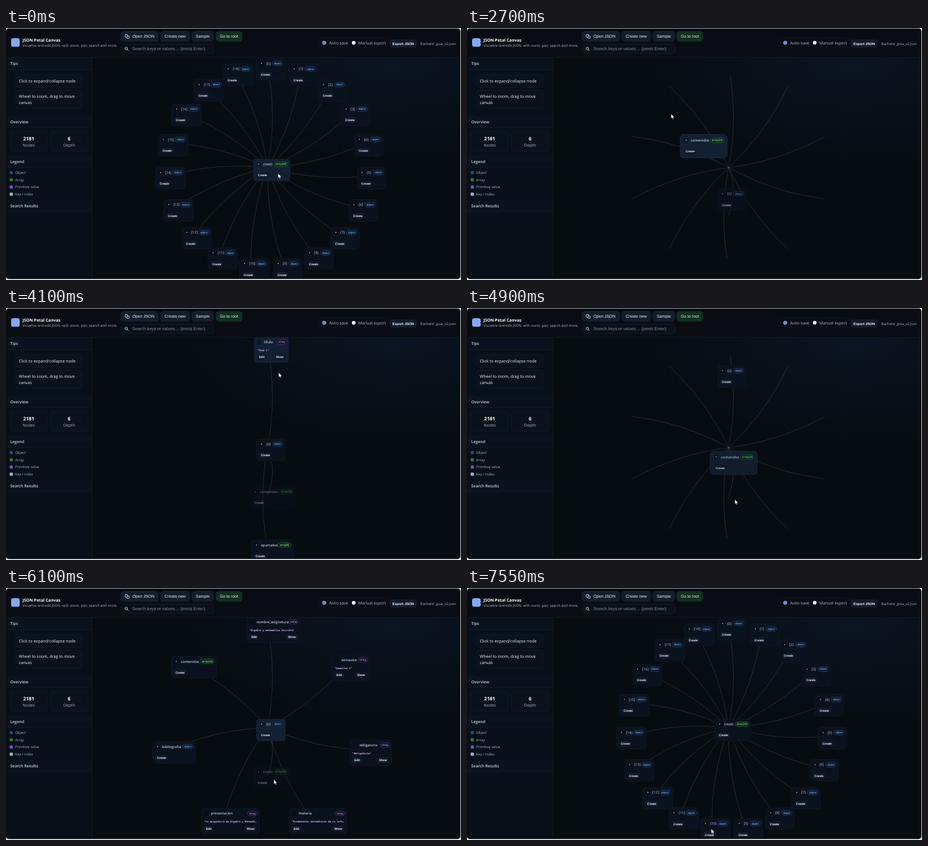
Write an HTML page that moves like this. It is 800 px wide and 444 px high and loops after 7650 ms.

```html
<!DOCTYPE html>
<html lang="en">
<head>
<meta charset="utf-8">
<title>JSON Petal Canvas</title>
<style>
  html, body { margin: 0; width: 100%; height: 100%; overflow: hidden; background: #dfe6ea; }
  svg { display: block; width: 100%; height: 100%; }
  text { font-family: "Open Sans", "Noto Sans", sans-serif; text-rendering: geometricPrecision; }
  .ui { font-family: "Liberation Sans", Arial, sans-serif; }
  .mono { font-family: "DejaVu Sans Mono", monospace; }
</style>
</head>
<body>
<svg viewBox="0 0 800 444">
  <defs>
    <radialGradient id="glow" gradientUnits="userSpaceOnUse" cx="680" cy="50" r="370" gradientTransform="translate(0 25) scale(1 .5)">
      <stop offset="0" stop-color="#0b1522"/><stop offset="1" stop-color="#0b1522" stop-opacity="0"/>
    </radialGradient>
    <clipPath id="stageClip"><rect x="152" y="52" width="646" height="389"/></clipPath>
    <clipPath id="linkClip"><rect x="152" y="86" width="646" height="319.5"/></clipPath>
  </defs>
  <rect x="0" y=".7" width="799" height="441.5" rx="5" fill="#070c10"/>
  <rect x="152" y="52" width="646" height="389" fill="url(#glow)"/>
  <g id="chrome"></g>
  <g clip-path="url(#stageClip)">
    <g id="links" clip-path="url(#linkClip)" fill="none" stroke="#9fb3c8" stroke-opacity=".27" stroke-width=".7"></g>
    <g id="nodes"></g>
  </g>
  <path id="cursor" d="M0 0V7.8L1.8 6.2 3 9 4.3 8.4 3.1 5.8H5.6Z" fill="#fff" stroke="#111" stroke-width=".3"/>
</svg>
<script>
const $ = id => document.getElementById(id);
const clamp = v => Math.max(0, Math.min(1, v));
const mix = (a, b, k) => a + (b - a) * k;

const box = (x, y, w, h, r, fill, stroke = 'none') =>
  `<rect x="${x}" y="${y}" width="${w}" height="${h}" rx="${r}" fill="${fill}" stroke="${stroke}" stroke-width=".7"/>`;
const label = (x, y, str, size, fill, { weight = 400, anchor = 'start', cls = '' } = {}) =>
  `<text x="${x}" y="${y}" font-size="${size}" fill="${fill}" font-weight="${weight}" text-anchor="${anchor}" class="${cls}">${str}</text>`;
const middle = { anchor: 'middle' };
const ui = { anchor: 'middle', cls: 'ui' };
const uiBold = { ...ui, weight: 700 };

// ---- Header and sidebar ----
function drawChrome() {
  const line = '#142030', pale = '#f0f4f9', grey = '#a9b5c4';
  const button = (x, w, str, tx, fill = '#131d2b') =>
    box(x, 6, w, 17.5, 4.5, fill, '#172438') + label(tx, 17.2, str, 7.2, pale, ui);
  const section = (y, h, str) =>
    box(1, y, 150, h, 0, '#0a131d') + box(1, y + h, 150, .7, 0, line) +
    label(7.5, y + h / 2 + 2.6, str, 7, '#ccd4df', { weight: 600 });
  const stat = (x, value, name) =>
    box(x, 182, 66.5, 35, 4.5, '#0a121c', line) +
    label(x + 33.5, 198, value, 8.5, '#fff', { ...middle, weight: 700 }) +
    label(x + 33.5, 209.2, name, 7.2, grey, middle);
  const legend = [['Object', '#274b7c'], ['Array', '#2b7a3e'], ['Primitive value', '#7d50c6'], ['Key / Index', '#a7afba']];

  return box(1, 1, 797, 50, 4, '#090d13') + box(1, 51, 150, 390, 4, '#081019') +
    box(1, 51, 797, .7, 0, line) + box(151, 51, .7, 390, 0, line) +
    box(9, 18, 15, 15, 3.5, '#83a9f5') +
    label(29, 23.6, 'JSON Petal Canvas', 7.3, '#fff', { weight: 700 }) +
    label(29, 32.8, 'Visualize and edit JSON, with zoom, pan, search and more.', 6.18, '#b0bbc9') +
    button(202, 66, 'Open JSON', 241.5) + button(272, 51, 'Create new', 297.5) +
    button(327, 38, 'Sample', 346) + button(369, 46, 'Go to root', 392, '#11301f') +
    '<path d="M209.5 11.5h4v4.5h-4zM213 14h3.500v4h-4v-2" fill="none" stroke="#dfe6ef" stroke-width=".8"/>' +
    box(202, 28, 164, 17, 4.5, '#0a1119', '#172333') +
    '<path d="M213.200 37.800l2.200 2.200" stroke="#e8edf4" stroke-width="1"/><circle cx="211.500" cy="36" r="2.200" fill="none" stroke="#e8edf4" stroke-width=".9"/>' +
    label(222, 39.2, 'Search keys or values… (press Enter)', 7.6, '#7f8995', { cls: 'ui' }) +
    box(549.5, 18, 122, 15.5, 4, 'none', '#0f1826') +
    '<circle cx="559.500" cy="26" r="3" fill="#4f8ae0" stroke="#b9cdec" stroke-width=".8"/><circle cx="611.300" cy="26" r="3.200" fill="#fff"/>' +
    label(568, 28.6, 'Auto-save', 7.3, '#b2bdcb') + label(619.5, 28.6, 'Manual export', 7.15, '#b2bdcb') +
    box(675, 21, 47, 13, 4, '#121c2a', '#172438') + label(698.3, 29.8, 'Export JSON', 6.17, '#f5f8fc', uiBold) +
    label(728.5, 29.8, 'Bachelor_guia_v2.json', 6.08, grey) +
    section(52, 21, 'Tips') + section(155, 20, 'Overview') + section(225, 20, 'Legend') + section(303, 20, 'Search Results') +
    box(17, 82, 116, 22.5, 4.5, '#0a121b', line) + label(22.5, 96, 'Click to expand/collapse node', 7.2, pale) +
    box(17, 109.5, 116, 32.5, 4.5, '#0a121b', line) +
    label(22.5, 123, 'Wheel to zoom, drag to move', 7.2, pale) + label(22.5, 133.8, 'canvas', 7.2, pale) +
    stat(6.5, '2181', 'Nodes') + stat(77.5, '6', 'Depth') +
    legend.map(([name, color], i) =>
      box(6.5, 252 + i * 12.7, 5.5, 5.5, 1.2, color) + label(16, 257 + i * 12.7, name, 6.18, grey)).join('');
}

// ---- Graph data ----
const node = (key, type, width, value) => ({ key, type, width, height: value ? 45 : 38, value });
const indexed = count => Array.from({ length: count }, (_, i) => node(`[${i}]`, 'object', i > 9 ? 52.5 : 50.5));

const root = node('(root)', 'array[19]', 64);
const contents = node('contenidos', 'array[10]', 79.5);
const courses = indexed(19), topics = indexed(10);
const fields = [
  node('nombre_asignatura', 'string', 95, '"Álgebra y matemática discreta"'),
  node('semestre', 'string', 67, '"Semestre 1"'),
  node('obligatorio', 'string', 74, '"Obligatorio"'),
  node('materia', 'string', 102, '"Fundamentos matemáticos de la info…'),
  node('presentacion', 'string', 102, '"La asignatura de Álgebra y Matemát…'),
  node('bibliografia', 'object', 75.5),
  contents
];
const parts = [node('titulo', 'string', 60, '"Tema 1"'), node('apartados', 'array[6]', 74)];

const rootView = { focus: root, children: courses };
const courseView = { focus: courses[0], parent: root, children: fields };
const contentsView = { focus: contents, parent: courses[0], children: topics };
const topicView = { focus: topics[0], parent: contents, children: parts };

// Each step appears abruptly with its move already partly done.
const steps = [
  { at: 0, view: rootView, done: 1 },
  { at: 1500, view: courseView, done: .87 },
  { at: 2700, view: contentsView, done: .62 },
  { at: 3800, view: topicView, done: .6 },
  { at: 4900, view: contentsView, done: .73 },
  { at: 5600, view: courseView, done: .55 },
  { at: 6400, view: rootView, done: .65 }
];
const LOOP = 7650, TICK = 50;
const HUB = { x: 460, y: 246 }, RADIUS = 177.5, PARENT_GAP = 84;

function layout({ focus, parent, children }) {
  const places = new Map();
  if (parent) places.set(parent, { x: HUB.x, y: HUB.y + PARENT_GAP, opacity: .45 });
  children.forEach((child, i) => {
    const a = i / children.length * 2 * Math.PI;
    places.set(child, { x: HUB.x + RADIUS * Math.sin(a), y: HUB.y - RADIUS * Math.cos(a), opacity: 1 });
  });
  return places.set(focus, { ...HUB, opacity: 1 });
}

function link(a, b) {
  const dx = b.x - a.x, dy = b.y - a.y, bend = 17 / Math.hypot(dx, dy);
  const cx = (a.x + b.x) / 2 - dy * bend, cy = (a.y + b.y) / 2 + dx * bend;
  return `<path d="M${a.x} ${a.y}Q${cx} ${cy} ${b.x} ${b.y}"/>`;
}

// ---- Cursor ----
const cursorPath = [
  [0, 478.5, 256.5], [650, 478.5, 256.5], [1250, 474.5, 86.5], [1600, 474.5, 86.5], [2250, 359, 151.5],
  [3200, 359, 151.5], [3450, 480.5, 88], [3950, 480.5, 88], [4700, 471, 337.5], [7250, 471, 337.5], [7550, 429.5, 424.5]
];
function cursorAt(t) {
  const i = cursorPath.findIndex(p => p[0] > t);
  if (i < 0) return cursorPath.at(-1).slice(1);
  const [t0, x0, y0] = cursorPath[Math.max(0, i - 1)], [t1, x1, y1] = cursorPath[i];
  const u = clamp((t - t0) / (t1 - t0 || 1)), k = u * u * (3 - 2 * u);
  return [mix(x0, x1, k), mix(y0, y1, k)];
}

// ---- Nodes ----
const badges = {
  object: ['#0c1c33', '#22436d', '#a3c8f6'],
  array: ['#0d2716', '#23653a', '#b0f5bd'],
  string: ['#150f25', '#4e347d', '#d0b6f7']
};
const carets = { focus: 'M-1.3 -.7H1.3L0 1Z', child: 'M-.7 -1.3V1.3L1 0Z', parent: 'M-.7 -1.3V1.3L1 0Z' };

const corner = (n, p) => ({ x: p.x + n.width * (.113 - .5), y: p.y + n.height * (.11 - .5) });
const contains = (n, p, [px, py]) => {
  const { x, y } = corner(n, p);
  return px >= x && px <= x + n.width && py >= y && py <= y + n.height;
};

function drawNode(n, place, role, lit, ringed) {
  const { x, y } = corner(n, place), w = n.width, h = n.height;
  const [fill, stroke, ink] = badges[n.type.split('[')[0]];
  const pill = n.type === 'object' ? 19 : n.type === 'string' ? 17 : 24;
  const grow = ringed ? 1.5 : 0;
  const small = (bx, bw, str) =>
    box(bx, h - 14.2, bw, 9.2, 2.5, '#121b29') + label(bx + bw / 2, h - 7.7, str, 5.15, '#f5f8fc', uiBold);
  const caret = n.value ? '' : `<path transform="translate(9 8.700)" d="${carets[role]}" fill="#d5deea"/>`;
  const actions = n.value
    ? label(4.7, h / 2 + 2.3, n.value, 4.25, '#d6bcff', { cls: 'mono', weight: 700 }) + small(4.5, 17, 'Edit') + small(w - 26, 21, 'Show')
    : small(5, 21.5, 'Create');
  return `<g transform="translate(${x} ${y})" opacity="${place.opacity}">` +
    box(-grow, -grow, w + 2 * grow, h + 2 * grow, 4.5 + grow, lit ? '#132033' : '#0a121e', ringed ? '#26364d' : lit ? '#182840' : '#101c2b') +
    box(5, 4.7, 8, 8, 2, lit ? '#0c1522' : '#080e16') + caret +
    label(17, 11, n.key, 6.05, '#c0cbd8', { weight: n.key[0] === '[' ? 400 : 600 }) +
    box(w - pill - 4, 4.5, pill, 8.4, 4.2, fill, stroke) +
    label(w - pill / 2 - 4, 10.3, n.type, 4.7, ink, ui) +
    actions + '</g>';
}

function render(t) {
  const index = steps.findLastIndex(s => s.at <= t);
  const { at, view, done } = steps[index], age = t - at;
  const target = layout(view), before = index ? layout(steps[index - 1].view) : target;
  const progress = 1 - (1 - done) * (1 - clamp(age / 200)) ** 2;
  const appear = index ? clamp((age - 80) / 200) : 1;

  const cursor = cursorAt(t), trailing = cursorAt(t - 110), resting = cursorAt(at);
  const still = Math.hypot(cursor[0] - resting[0], cursor[1] - resting[1]) < .5;

  let html = '';
  for (const [n, to] of target) {
    const from = before.get(n);
    const place = from
      ? { x: mix(from.x, to.x, progress), y: mix(from.y, to.y, progress), opacity: mix(from.opacity, to.opacity, progress) }
      : { ...to, opacity: to.opacity * appear };
    if (!place.opacity) continue;
    const role = n === view.focus ? 'focus' : n === view.parent ? 'parent' : 'child';
    const lit = still ? role === 'focus' : contains(n, place, trailing);
    html += drawNode(n, place, role, lit, role === 'focus' && index > 0 && age < 200);
  }
  $('nodes').innerHTML = html;
  $('links').innerHTML = view.children.map(c => link(HUB, target.get(c))).join('') +
    (view.parent ? link(target.get(view.parent), HUB) : '');
  $('cursor').setAttribute('transform', `translate(${cursor})`);
}

$('chrome').innerHTML = drawChrome();
const start = performance.now();
let shown = -1;
function frame() {
  const t = Math.floor((performance.now() - start) % LOOP / TICK) * TICK;
  if (t !== shown) render(shown = t);
  requestAnimationFrame(frame);
}
frame();
</script>
</body>
</html>
```
